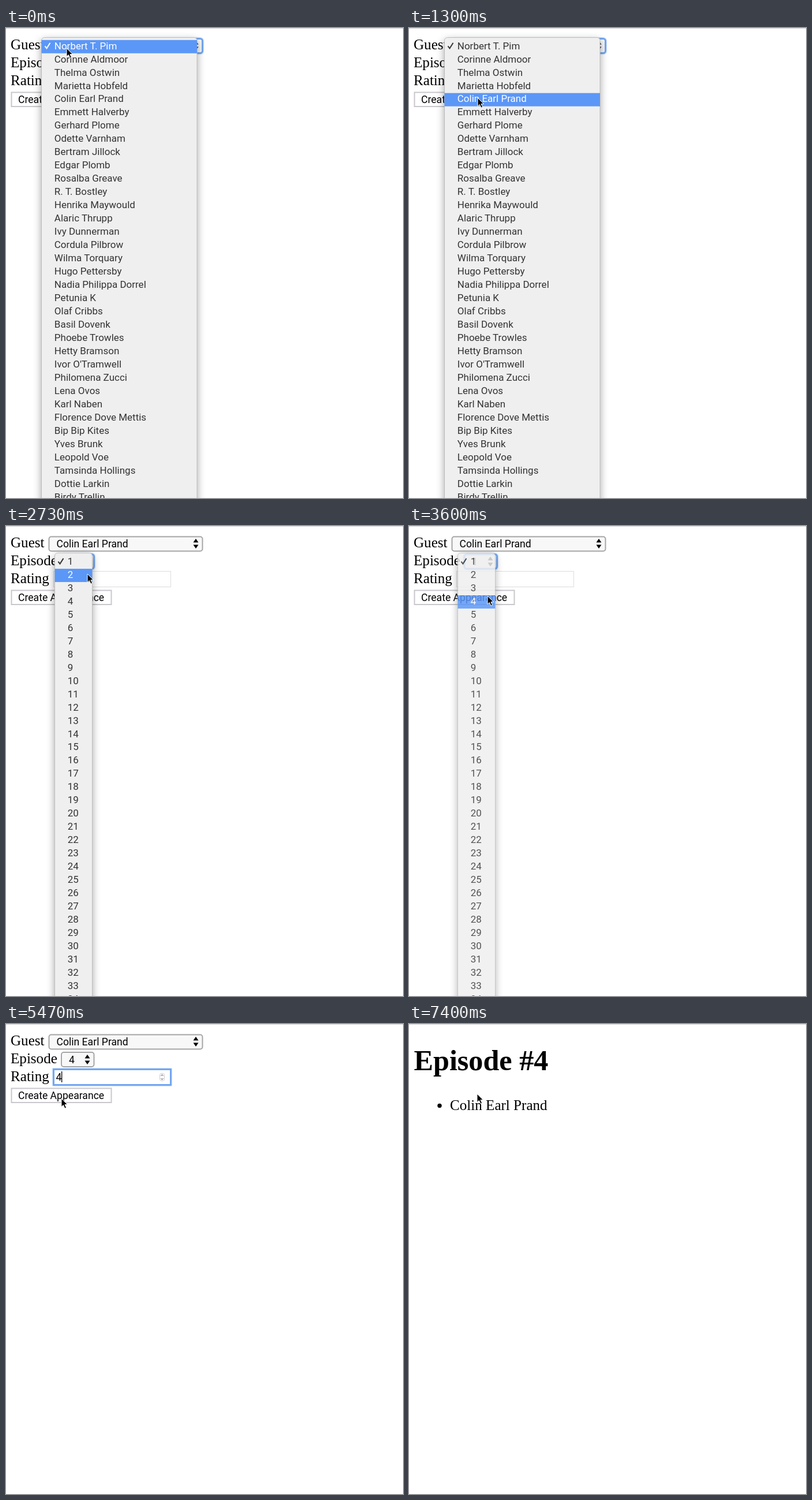
These frames come from a looping animation (688 by 814 pixels, 8000 ms). An HTML page:

```html
<!DOCTYPE html>
<html lang="en">
<head>
<meta charset="utf-8">
<title>Create Appearance</title>
<style>
  html, body { margin: 0; width: 100%; height: 100%; overflow: hidden; background: #fff; }
  svg { display: block; width: 688px; height: 814px; }
  text { white-space: pre; }
  .page { font: 25.1px "Liberation Serif", serif; }
  .control { font: 17.6px Roboto, sans-serif; }
  .menu { font: 17px Roboto, sans-serif; fill: #333; }
  .panel { fill: #efefef; stroke: #bdbdbd; filter: drop-shadow(0 5px 7px rgba(0,0,0,.36)); }
  .bar { fill: #5b97f7; }
  .check { fill: none; stroke: #333; stroke-width: 2; }
  .select { fill: #f8f8f8; stroke: #a6a6a6; stroke-width: 2; }
  .input { fill: #fff; stroke: #dcdcdc; }
  .button { fill: #fff; stroke: #c9c7cb; stroke-width: 2; }
  .button.pressed { fill: #e9e9e9; }
  .focus { stroke: #73a7f1; stroke-width: 3; filter: drop-shadow(0 0 1px #8ab8f8); }
</style>
</head>
<body>
<svg id="stage" viewBox="0 0 688 814"></svg>
<script>
const LOOP = 8000;
const ROW = 22.97;
const guests = [
  "Norbert T. Pim", "Corinne Aldmoor", "Thelma Ostwin", "Marietta Hobfeld",
  "Colin Earl Prand", "Emmett Halverby", "Gerhard Plome", "Odette Varnham",
  "Bertram Jillock", "Edgar Plomb", "Rosalba Greave", "R. T. Bostley",
  "Henrika Maywould", "Alaric Thrupp", "Ivy Dunnerman", "Cordula Pilbrow",
  "Wilma Torquary", "Hugo Pettersby", "Nadia Philippa Dorrel", "Petunia K",
  "Olaf Cribbs", "Basil Dovenk", "Phoebe Trowles", "Hetty Bramson",
  "Ivor O'Tramwell", "Philomena Zucci", "Lena Ovos", "Karl Naben",
  "Florence Dove Mettis", "Bip Bip Kites", "Yves Brunk", "Leopold Voe",
  "Tamsinda Hollings", "Dottie Larkin", "Birdy Trellin"
];
const episodes = Array.from({ length: 34 }, (_, i) => i + 1);

// Menu timing: open, click on the item, start and end of the fade, value update.
const menus = {
  guest: { x: 61.5, y: 16.5, width: 269.5, items: guests, pick: 4,
           open: 0, click: 1400, fade: 1530, gone: 1730, update: 1930 },
  episode: { x: 84.5, y: 46.8, width: 65, items: episodes, pick: 3,
             open: 2070, click: 3430, fade: 3570, gone: 3770, update: 3930 }
};
const RATING_FOCUS = 4200, TYPED = 5070, POINTER_BACK = 5330;
const PRESS = 6270, RELEASE = 6400, NEXT_PAGE = 6670;

const pointerPath = [
  [0, 105, 35], [300, 105, 35], [1000, 119, 121], [1450, 119, 121],
  [1800, 135, 82], [2000, 141, 62], [2450, 141, 62], [2700, 141, 83],
  [2850, 141, 83], [3250, 136, 121], [3650, 136, 121], [4100, 145, 92],
  [5330, 145, 92], [5470, 96, 129], [5580, 92, 145], [5800, 118, 121], [LOOP, 118, 121]
];

const box = (id, type, x, y, w, h, r = 0) =>
  `<rect id="${id}" class="${type}" x="${x}" y="${y}" width="${w}" height="${h}" rx="${r}"/>`;
const label = (x, y, text, extra = "") => `<text x="${x}" y="${y}" ${extra}>${text}</text>`;
const arrows = (x, y) =>
  `<path d="M${x - 4.5} ${y - 2}h9l-4.5 -6.5zM${x - 4.5} ${y + 2}h9l-4.5 6.5z"/>`;

function menuMarkup(name, { x, y, width, items }) {
  const top = y + 4.3;
  const rows = items.map((item, i) => label(x + 22.3, top + 15.8 + i * ROW, item)).join("");
  return `<g id="${name}Menu" class="menu">
    ${box("", "panel", x, y, width, 830, 5)}
    ${box(name + "Bar", "bar", x, top, width, ROW)}
    ${rows}
    <path class="check" id="${name}Check" d="M${x + 6} ${top + 10.5}l3 4l6 -9.5"/>
  </g>`;
}

document.getElementById("stage").innerHTML = `
  <g id="form">
    <g class="page">${label(8, 37, "Guest")}${label(8, 68, "Episode")}${label(8, 98.5, "Rating")}</g>
    <g class="control">
      ${box("guestSelect", "select", 74.5, 18.5, 266, 25, 4)}
      ${label(87.5, 36.5, "", 'id="guestValue"')}${arrows(329, 30.5)}
      ${box("episodeSelect", "select", 96, 49, 56.5, 25, 4)}
      ${label(109, 67.7, "", 'id="episodeValue"')}${arrows(141, 61.5)}
      ${box("ratingInput", "input", 82.5, 78.5, 203, 27)}
      ${label(86.5, 98, "4", 'id="ratingValue"')}
      <rect id="caret" y="82" width="1.3" height="19"/>
      <g id="spinner" fill="none" stroke="#ccc">
        <rect x="266.5" y="85.5" width="8" height="13" rx="3.5"/>
        <path stroke="#555" d="M268.5 90l2 -2.5l2 2.5M268.5 94l2 2.5l2 -2.5"/>
      </g>
      ${box("button", "button", 9.5, 111.5, 173, 24.5)}
      ${label(21, 129.5, "Create Appearance")}
    </g>
  </g>
  <g id="result" class="page">
    ${label(8.5, 80, "Episode #4", 'font-size="50.2" font-weight="bold"')}
    <circle cx="53" cy="141.5" r="3.7"/>
    ${label(71, 148.5, guests[4])}
  </g>
  <path d="M0 .5H688" stroke="#cfcfcf"/>
  ${menuMarkup("guest", menus.guest)}
  ${menuMarkup("episode", menus.episode)}
  <path id="arrow" stroke="#fff" d="M0 0V14.5L3.4 11.4L6 17.2L8.6 16L6 10.5H10.5Z"/>
  <path id="beam" fill="none" stroke="#222" stroke-width="1.3"
    d="M-3 -8.5Q0 -8.5 0 -6Q0 -8.5 3 -8.5M0 -6V6M-3 8.5Q0 8.5 0 6Q0 8.5 3 8.5M-2 3H2"/>`;

const $ = id => document.getElementById(id);
const show = (id, on) => $(id).style.display = on ? "" : "none";
const between = (t, from, to) => t >= from && t < to;
const clamp = (v, lo, hi) => Math.min(hi, Math.max(lo, v));

function pointerAt(t) {
  const i = pointerPath.findIndex(point => point[0] > t);
  const [t0, x0, y0] = pointerPath[i - 1], [t1, x1, y1] = pointerPath[i];
  const p = (t - t0) / (t1 - t0), e = p * p * (3 - 2 * p);
  return [x0 + (x1 - x0) * e, y0 + (y1 - y0) * e];
}

function drawMenu(name, t, pointerY) {
  const { y, items, pick, open, click, fade, gone, update } = menus[name];
  const top = y + 4.3;
  const hovered = clamp(Math.floor((pointerY - top) / ROW), 0, items.length - 1);
  const row = t < click ? hovered : pick;
  const lit = !between(t, click + 30, click + 90);
  show(name + "Menu", between(t, open, gone));
  $(name + "Menu").style.opacity = 1 - clamp((t - fade) / (gone - fade), 0, 1);
  show(name + "Bar", lit);
  $(name + "Bar").setAttribute("y", top + row * ROW);
  $(name + "Menu").querySelectorAll("text").forEach((text, i) =>
    text.style.fill = lit && i === row ? "#fff" : "");
  $(name + "Check").style.stroke = lit && row === 0 ? "#fff" : "";
  $(name + "Value").textContent = items[t < update ? 0 : pick];
}

function draw(t) {
  const [x, y] = pointerAt(t);
  drawMenu("guest", t, y);
  drawMenu("episode", t, y);

  const rating = between(t, RATING_FOCUS, PRESS);
  const typed = t >= TYPED;
  $("guestSelect").classList.toggle("focus", t < menus.episode.open);
  $("episodeSelect").classList.toggle("focus", between(t, menus.episode.open, RATING_FOCUS));
  $("ratingInput").classList.toggle("focus", rating);
  $("button").classList.toggle("focus", t >= PRESS);
  $("button").classList.toggle("pressed", between(t, PRESS, RELEASE));

  const blinkStart = typed ? TYPED : RATING_FOCUS;
  show("ratingValue", typed);
  show("spinner", rating);
  show("caret", rating && (t - blinkStart) % 1000 < 500);
  $("caret").setAttribute("x", typed ? 96 : 85.7);

  show("form", t < NEXT_PAGE);
  show("result", t >= NEXT_PAGE);

  const overText = between(t, 4000, 5400) && y < 106;
  const hidden = between(t, TYPED, POINTER_BACK);
  show("arrow", !overText && !hidden);
  show("beam", overText && !hidden);
  for (const id of ["arrow", "beam"]) $(id).setAttribute("transform", `translate(${x} ${y})`);
}

function frame() {
  draw(performance.now() % LOOP);
  requestAnimationFrame(frame);
}
frame();
</script>
</body>
</html>
```
